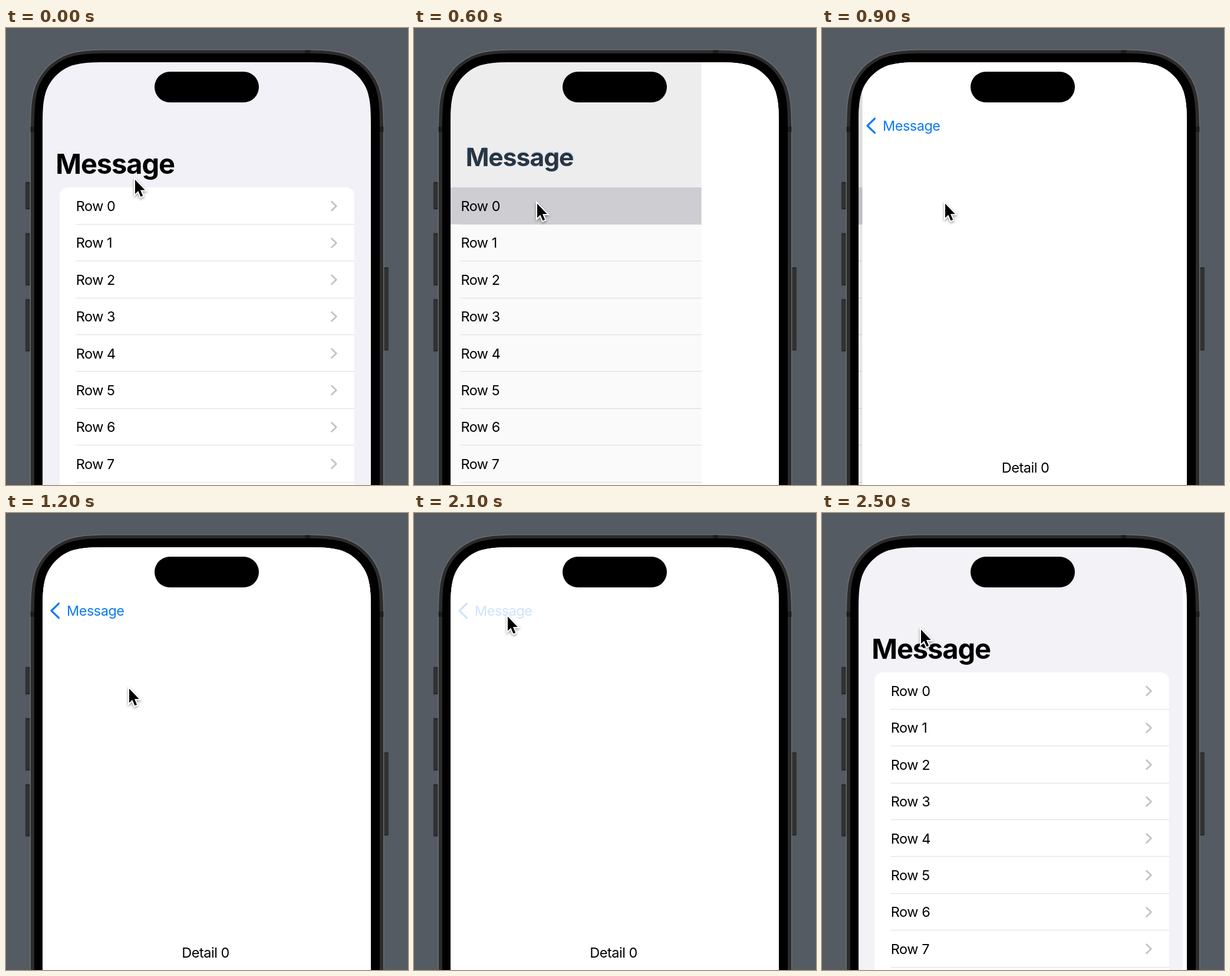
Animation of 682 by 774 pixels, one loop 2600 ms. Source, as an HTML page with a canvas:

```html
<!DOCTYPE html>
<html lang="en">
<head>
<meta charset="utf-8">
<title>List navigation</title>
<style>
  html, body { margin: 0; width: 100%; height: 100%; overflow: hidden; background: #545b62; }
  canvas { display: block; }
</style>
</head>
<body>
<canvas id="stage" width="682" height="774"></canvas>
<script>
const ctx = document.getElementById('stage').getContext('2d');
const LOOP = 2600, STEP = 100;
const PRESS = 500, PUSH = 550, TOUCH = 2100, POP = 2150, MORPH = 340;
const SCREEN = { x: 62, y: 58, w: 557, h: 900 };
const BLUE = '#0b7af5';
const FAMILY = 'Inter, Roboto, sans-serif';

const clamp = v => Math.max(0, Math.min(1, v));
const lerp = (a, b, k) => a + (b - a) * k;

// Critically damped spring, 0 to 1
function spring(ms) {
  const x = Math.max(0, ms) * 0.01845;
  return 1 - (1 + x) * Math.exp(-x);
}

// cubic-bezier(.25, .1, .25, 1)
function ease(k) {
  k = clamp(k);
  if (k === 0 || k === 1) return k;
  const bez = (a, b, u) => 3 * a * u * (1 - u) ** 2 + 3 * b * u * u * (1 - u) + u ** 3;
  let lo = 0, hi = 1;
  for (let i = 0; i < 24; i++) {
    const mid = (lo + hi) / 2;
    if (bez(0.25, 0.25, mid) < k) lo = mid; else hi = mid;
  }
  return bez(0.1, 1, lo);
}

// Rectangle with continuous-curvature corners
function squircle(x, y, w, h, r) {
  const path = new Path2D();
  const corner = (px, py, ux, uy, vx, vy) => {
    const at = (a, b) => [px - ux * a * r + vx * b * r, py - uy * a * r + vy * b * r];
    path.lineTo(...at(1.5287, 0));
    path.bezierCurveTo(...at(1.0885, 0), ...at(0.8684, 0), ...at(0.6315, 0.0749));
    path.bezierCurveTo(...at(0.3728, 0.1691), ...at(0.1691, 0.3728), ...at(0.0749, 0.6315));
    path.bezierCurveTo(...at(0, 0.8684), ...at(0, 1.0885), ...at(0, 1.5287));
  };
  path.moveTo(x + r * 1.5287, y);
  corner(x + w, y, 1, 0, 0, 1);
  corner(x + w, y + h, 0, 1, -1, 0);
  corner(x, y + h, -1, 0, 0, -1);
  corner(x, y, 0, -1, 1, 0);
  path.closePath();
  return path;
}

const body = squircle(40.5, 36, 601, 940, 101);
const rim = squircle(42, 37.6, 598, 937, 99.5);
const bezel = squircle(48, 43, 586, 926, 92);
const glass = squircle(SCREEN.x, SCREEN.y, SCREEN.w, SCREEN.h, 78);

function box(x, y, w, h, color) {
  ctx.fillStyle = color;
  ctx.fillRect(x, y, w, h);
}

function text(str, x, y, size, weight, spacing, color) {
  ctx.font = `${weight} ${size}px ${FAMILY}`;
  ctx.letterSpacing = spacing + 'px';
  ctx.fillStyle = color;
  ctx.fillText(str, x, y);
}

const label = (str, x, y, color = '#000') => text(str, x, y, 23.5, 400, -0.5, color);

function polyline(points, width, color) {
  ctx.beginPath();
  points.forEach(p => ctx.lineTo(...p));
  ctx.lineWidth = width;
  ctx.lineCap = ctx.lineJoin = 'round';
  ctx.strokeStyle = color;
  ctx.stroke();
}

function sideButton(x, y, h) {
  ctx.save();
  ctx.shadowColor = 'rgba(0,0,0,.25)';
  ctx.shadowBlur = 2;
  box(x, y, 7.5, h, '#262627');
  ctx.restore();
  box(x + 1, y + 2, 5.5, h - 4, '#323233');
}

function phone() {
  box(0, 0, 682, 774, '#545b62');
  sideButton(33.3, 261, 46);
  sideButton(33.3, 347.5, 88.5);
  sideButton(33.3, 459.5, 88);
  sideButton(641, 405.5, 140.5);
  ctx.fillStyle = '#6c6c6d';
  ctx.fill(body);
  ctx.fillStyle = '#2b2b2c';
  ctx.fill(rim);
  box(507, 37.5, 9, 6, '#1c1c1d');
  box(41.5, 167, 7, 9, '#1c1c1d');
  box(633.5, 167, 7, 9, '#1c1c1d');
  ctx.fillStyle = '#000';
  ctx.fill(bezel);
}

function list(slide, glow) {
  box(SCREEN.x, SCREEN.y, SCREEN.w, 716, '#f2f1f7');
  // The backdrop turns neutral while sliding
  box(SCREEN.x, SCREEN.y, SCREEN.w, 716, `rgba(242,242,242,${clamp(slide * 3)})`);
  ctx.save();
  ctx.translate(-0.3 * SCREEN.w * slide, 0);
  ctx.beginPath();
  ctx.roundRect(91, 270, 500, 600, 14);
  ctx.clip();
  box(91, 270, 500, 600, '#fff');
  for (let i = 0; i < 8; i++) box(118.5, Math.floor(332.2 + 62.4 * i), 473, 1, '#dedee0');
  ctx.globalAlpha = glow;
  box(91, 270, 500, 62.6, '#d1d1d6');
  ctx.globalAlpha = 1;
  for (let i = 0; i < 8; i++) {
    const y = 301.5 + 62.4 * i;
    label('Row ' + i, 118.8, y + 8.5);
    polyline([[552.5, y - 7.5], [560.3, y], [552.5, y + 7.5]], 2.8, '#c3c3c6');
  }
  ctx.restore();
  box(SCREEN.x, SCREEN.y, SCREEN.w, 716, `rgba(0,0,0,${0.09 * slide})`);
}

function detail(slide) {
  const dx = SCREEN.w * (1 - slide);
  box(SCREEN.x + dx, SCREEN.y, SCREEN.w, 716, '#fff');
  label('Detail 0', 298.3 + dx, 752.7);
}

// Large title shrinking into the back button
function navTitle(k, tint) {
  const scale = lerp(1, 96 / 201, k);
  const layer = (alpha, size, draw) => {
    ctx.save();
    ctx.globalAlpha = alpha;
    ctx.translate(lerp(87.5, 105, k), lerp(247.2, 174, k));
    ctx.scale(size, size);
    draw();
    ctx.restore();
  };
  layer(1 - k, scale, () => text('Message', -3.3, 0, 47, 700, -1.1, '#000'));
  layer(k * tint, scale * 201 / 96, () => label('Message', -2, 0, BLUE));
  ctx.globalAlpha = clamp((k - 0.4) / 0.6) * tint;
  polyline([[89.5, 153.3], [77, 165.5], [89.5, 177.7]], 3.2, BLUE);
  ctx.globalAlpha = 1;
}

// time, x, y
const trail = [
  [0, 219, 257], [100, 217, 263], [200, 213, 278], [300, 210, 291], [400, 209, 297.5],
  [1500, 209, 297.5], [1600, 195, 250], [1700, 172, 192], [1800, 162, 178.5], [1900, 159, 175.5],
  [2300, 159, 175.5], [2400, 161, 181], [2500, 168, 197.5], [2600, 168, 197.5]
];

function pointer(t) {
  const n = trail.findIndex(p => p[0] > t);
  const a = trail[n - 1], b = trail[n], k = (t - a[0]) / (b[0] - a[0]);
  ctx.save();
  ctx.translate(lerp(a[1], b[1], k), lerp(a[2], b[2], k));
  const arrow = new Path2D('M0 0V24L5.3 19L9.5 28.8L13.2 27.2L9 17.5H16.8Z');
  ctx.lineWidth = 4;
  ctx.lineJoin = 'miter';
  ctx.strokeStyle = '#fff';
  ctx.shadowColor = 'rgba(0,0,0,.4)';
  ctx.shadowBlur = 4;
  ctx.shadowOffsetY = 2;
  ctx.stroke(arrow);
  ctx.shadowColor = 'transparent';
  ctx.fillStyle = '#000';
  ctx.fill(arrow);
  ctx.restore();
}

function render(t) {
  const back = t >= POP;
  const slide = back ? 1 - spring(t - POP) : spring(t - PUSH);
  const morph = back ? 1 - ease((t - POP) / MORPH) : ease((t - PUSH) / MORPH);
  const glow = back ? slide : t >= PRESS ? 1 : 0;
  const tint = back ? 0.5 : t >= TOUCH ? 0.2 : 1;

  phone();
  ctx.save();
  ctx.clip(glass);
  list(slide, glow);
  if (slide > 0) detail(slide);
  navTitle(morph, tint);
  ctx.restore();

  ctx.fillStyle = '#000';
  ctx.beginPath();
  ctx.roundRect(252, 74, 177, 52, 26);
  ctx.fill();
  pointer(t);
}

const start = performance.now();
function tick() {
  const t = (performance.now() - start) % LOOP;
  render(Math.floor(t / STEP) * STEP);
  requestAnimationFrame(tick);
}
tick();
</script>
</body>
</html>
```
